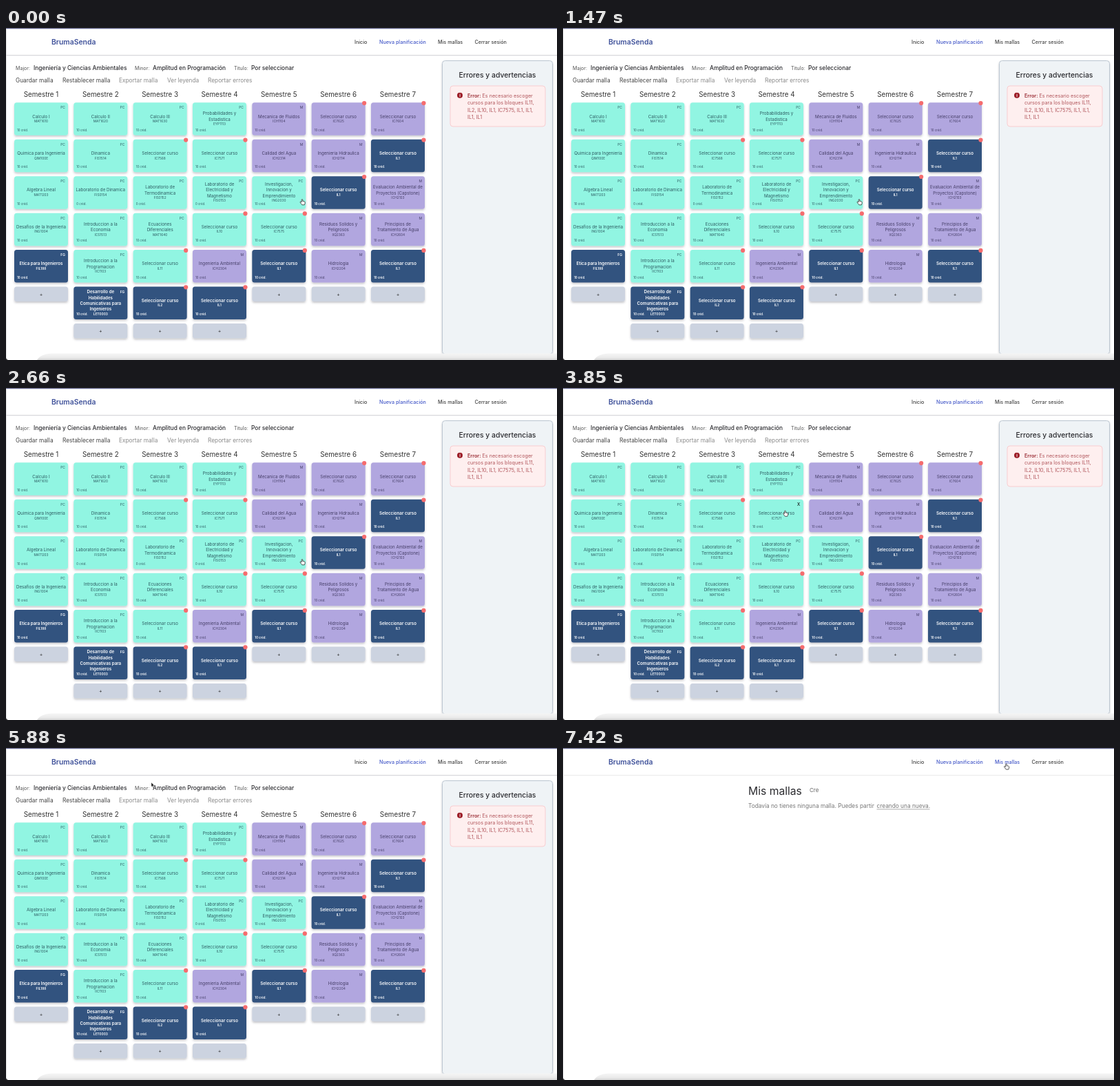
An HTML page that plays this animation: 800x482 px, repeating every 8000 ms.

```html
<!DOCTYPE html>
<html lang="es">
<head>
<meta charset="utf-8">
<title>BrumaSenda</title>
<style>
html, body { margin: 0; width: 100%; height: 100%; overflow: hidden; background: #fff; }
svg { display: block; width: 100%; height: 100%; }
text { font-family: Inter, sans-serif; white-space: pre; }
</style>
</head>
<body>
<svg id="stage" viewBox="0 0 800 482">
  <defs>
    <filter id="shadow" x="-10%" y="-10%" width="120%" height="125%">
      <feDropShadow dx="0" dy="2" stdDeviation="1.8" flood-color="#445" flood-opacity=".3"/>
    </filter>
    <linearGradient id="dock" x1="0" y1="0" x2="0" y2="1">
      <stop offset="0" stop-color="#f5f5f5"/><stop offset=".6" stop-color="#ebebeb"/><stop offset="1" stop-color="#d6d6d6"/>
    </linearGradient>
  </defs>
  <g id="planner"></g>
  <g id="list"></g>
  <g id="frame"></g>
  <circle id="ring" cx="643" cy="22" fill="#6d8cf5" fill-opacity=".12" stroke="#7c99ef" stroke-width="1.4"/>
  <g id="cursor">
    <path id="hand" fill="#fff" stroke="#222" stroke-width=".75" stroke-linejoin="round"
      d="M-1 7.2L-2.9 4.6Q-3.2 3.3-1.6 3.8L-.8 4.5V.6Q0-.4.8.6V3Q3.6 3 4.2 4.2Q4.4 6.4 3.3 8.3H-.2Z"/>
    <path id="arrow" fill="#111" stroke="#fff" stroke-width=".4" d="M0 0V6.4L1.4 5.1L2.4 7.4L3.4 7L2.4 4.8H4.4Z"/>
  </g>
</svg>
<script>
const LOOP = 8000, PAGE_AT = 7415;
const $ = id => document.getElementById(id);

// y is the vertical middle of the capitals
const text = (x, y, size, str, fill = '#333', weight = 400, extra = '') =>
  `<text x="${x}" y="${y + size * .36}" font-size="${size}" fill="${fill}" font-weight="${weight}" ${extra}>${str}</text>`;
const mid = (x, y, size, str, fill, weight) => text(x, y, size, str, fill, weight, 'text-anchor="middle"');
const rect = (x, y, w, h, r, fill, extra = '') =>
  `<rect x="${x}" y="${y}" width="${w}" height="${h}" rx="${r}" fill="${fill}" ${extra}/>`;

// title ; code ; tag ; kind: t teal, p purple, n navy ; credits
const pick = 'Seleccionar curso';
const plan = [
  ['Calculo I;MAT1610;PC;t', 'Quimica para Ingenieria;QIM100E;PC;t', 'Algebra Lineal;MAT1203;PC;t',
   'Desafios de la Ingenieria;ING1004;PC;t', 'Etica para Ingenieros;FIL188;FG;n'],
  ['Calculo II;MAT1620;PC;t', 'Dinamica;FIS1514;PC;t', 'Laboratorio de Dinamica;FIS0154;PC;t;0',
   'Introduccion a la|Economia;ICS1513;PC;t', 'Introduccion a la|Programacion;IIC1103;PC;t',
   'Desarrollo de|Habilidades|Comunicativas para|Ingenieros;LET0003;FG;n'],
  ['Calculo III;MAT1630;PC;t', pick + ';IC7568;;t', 'Laboratorio de|Termodinamica;FIS0152;PC;t;0',
   'Ecuaciones|Diferenciales;MAT1640;PC;t', pick + ';IL11;;t', pick + ';IL2;;n'],
  ['Probabilidades y|Estadistica;EYP1113;PC;t', pick + ';IC7571;;t',
   'Laboratorio de|Electricidad y|Magnetismo;FIS0153;PC;t;0', pick + ';IL10;;t',
   'Ingenieria Ambiental;ICH2304;M;p', pick + ';IL1;;n'],
  ['Mecanica de Fluidos;ICH1104;M;p', 'Calidad del Agua;ICH2314;M;p',
   'Investigacion,|Innovacion y|Emprendimiento;ING2030;PC;t', pick + ';IC7575;;t', pick + ';IL1;;n'],
  [pick + ';IC7625;;p', 'Ingenieria Hidraulica;ICH2114;M;p', pick + ';IL1;;n',
   'Residuos Solidos y|Peligrosos;IIQ2363;M;p', 'Hidrologia;ICH2204;M;p'],
  [pick + ';IC7604;;p', pick + ';IL1;;n', 'Evaluacion Ambiental de|Proyectos (Capstone);ICH2103;M;p',
   'Principios de|Tratamiento de Agua;ICH2604;M;p', pick + ';IL1;;n']
];
const fills = { t: '#91f5e2', p: '#b1a6df', n: '#32527f' };
const inks = { t: '#2c5a60', p: '#443d66', n: '#fff' };
const W = 78, H = 47.5;
const colX = c => 12 + c * 86.33, rowY = r => 108.3 + r * 53.45;
const cards = [];

function card(spec, c, r) {
  const [title, code, tag, kind, credits = 10] = spec.split(';');
  const x = colX(c), y = rowY(r), ink = inks[kind], weight = kind === 'n' ? 600 : 400;
  const lines = title.split('|'), top = y + 20 - (lines.length - 1) * 4.2;
  const open = title === pick, id = `mark${c}${r}`;
  cards.push({ x, y, id: open && id });
  return lines.map((s, i) => mid(x + W / 2, top + i * 8.4, 6.2, s, ink, weight)).join('') +
    mid(x + W / 2, top + lines.length * 8.4 - 1.3, 4.8, code, ink, weight) +
    text(x + 4, y + 40, 4.3, credits + ' créd.', ink, weight) +
    text(x + W - 4, y + 7.2, 5, tag, ink, weight, 'text-anchor="end"') +
    (open ? `<g id="${id}"><circle cx="${x + W - 1.5}" cy="${y + .8}" r="3.1" fill="#f56c6e"/>` +
      text(x + W - 9, y + 7, 6, 'X', '#111', 500) + '</g>' : '');
}

function planner() {
  let boxes = '', labels = '';
  plan.forEach((col, c) => {
    labels += mid(colX(c) + W / 2, 96.8, 9.8, 'Semestre ' + (c + 1), '#333');
    col.forEach((spec, r) => {
      boxes += rect(colX(c), rowY(r), W, H, 3.5, fills[spec.split(';')[3]]);
      labels += card(spec, c, r);
    });
    boxes += rect(colX(c), rowY(col.length), W, 21.5, 3.5, '#ccd3e0');
    labels += mid(colX(c) + W / 2, rowY(col.length) + 10.5, 7, '+', '#333');
  });
  const info = [[14, 'Major:', 40, 'Ingeniería y Ciencias Ambientales'],
    [187, 'Minor:', 213, 'Amplitud en Programación'], [331, 'Título:', 356, 'Por seleccionar']];
  const tools = [[14, 'Guardar malla'], [82, 'Restablecer malla'], [164, 'Exportar malla'],
    [234, 'Ver leyenda'], [293, 'Reportar errores']];
  const red = '#b0545a';
  return info.map(([x, k, vx, v]) => text(x, 58, 7.1, k, '#555') + text(vx, 57.6, 8.4, v, '#2b2b2f', 500)).join('') +
    tools.map(([x, s], i) => text(x, 76.5, 8.3, s, i < 2 ? '#444' : '#8a8a8a')).join('') +
    `<g filter="url(#shadow)">${boxes}</g>` + labels +
    rect(633.5, 47.5, 160, 426, 4, '#eff3f6', 'stroke="#bcc6d1" filter="url(#shadow)"') +
    mid(713.5, 68.3, 10.4, 'Errores y advertencias', '#2b2b2f', 500) +
    rect(645, 84, 138, 59, 4, '#feefef', 'stroke="#f8cdd0"') +
    '<circle cx="659" cy="97.7" r="4" fill="#9c1c26"/>' + mid(659, 97.7, 6, 'i', '#fff', 700) +
    text(670, 98, 7.2, '<tspan font-weight="600" fill="#9c3038">Error:</tspan> Es necesario escoger', red) +
    ['cursos para los bloques IL11,', 'IL2, IL10, IL1, IC7575, IL1, IL1,', 'IL1, IL1']
      .map((s, i) => text(670, 108.5 + i * 10.5, 7.2, s, red)).join('');
}

const list = () =>
  text(269, 62, 15.7, 'Mis mallas', '#2b2b2f') + text(358, 61.5, 8, 'Cre', '#666') +
  text(269, 84.5, 8.3, 'Todavía no tienes ninguna malla. Puedes partir', '#777') +
  text(455.5, 84.5, 8.3, 'creando una nueva.', '#777') +
  rect(455.5, 88.6, 77, .7, 0, '#888');

const frame = () =>
  rect(0, 0, 800, 1.2, 0, '#62648c') + rect(0, 1, .8, 481, 0, '#dededf') +
  '<rect id="rule" y="39" width="800" height="1.2"/>' +
  text(66, 20.3, 10.4, 'BrumaSenda', '#41539b', 600) +
  text(506, 20.5, 7.2, 'Inicio', '#444', 500) +
  text(542, 20.5, 7.2, 'Nueva planificación', '#4458c8', 500) +
  text(627, 20.5, 7.2, 'Mis mallas', '#444', 500, 'id="mine"') +
  text(680.5, 20.5, 7.2, 'Cerrar sesión', '#444', 500) +
  '<path d="M45 482Q50 473 66 472.5H800V482Z" fill="url(#dock)"/><path d="M0 479Q.5 481.5 3 482H0Z" fill="#222"/>';

$('planner').innerHTML = planner();
$('list').innerHTML = list();
$('frame').innerHTML = frame();

// pointer stops: time, x, y
const stops = [[0, 430, 248.5], [3150, 430, 248.5], [3800, 322.5, 178], [4400, 322.5, 178],
  [5350, 211, 50], [5950, 211, 50], [6800, 643.5, 22.8], [LOOP, 643.5, 22.8]];

function pointer(t) {
  const i = stops.findIndex(s => s[0] > t), a = stops[i - 1], b = stops[i];
  const u = (t - a[0]) / (b[0] - a[0]), k = u * u * (3 - 2 * u);
  return [a[1] + (b[1] - a[1]) * k, a[2] + (b[2] - a[2]) * k];
}

const show = (el, on) => el.style.display = on ? '' : 'none';

function draw(now) {
  const t = now % LOOP, [x, y] = pointer(t), listed = t >= PAGE_AT;
  const over = (bx, by, w, h) => x >= bx && x <= bx + w && y >= by && y <= by + h;
  const onMine = over(625, 14, 41, 13);
  let hit = onMine;
  for (const c of cards) {
    const on = over(c.x, c.y, W, H);
    hit = hit || on;
    if (!c.id) continue;
    const [dot, cross] = $(c.id).children;
    show(dot, !on);
    show(cross, on);
  }
  show($('planner'), !listed);
  show($('list'), listed);
  $('rule').setAttribute('fill', listed ? '#ececec' : '#d7d7da');
  $('mine').setAttribute('fill', onMine ? '#4458c8' : '#444');
  show($('hand'), hit);
  show($('arrow'), !hit);
  $('cursor').setAttribute('transform', `translate(${x} ${y})`);
  show($('ring'), t >= 6930 && t < 7340);
  $('ring').setAttribute('r', Math.max(8, Math.min(13.7, 8 + (t - 6930) / 18)));
}

const start = performance.now();
function tick() {
  draw(performance.now() - start);
  requestAnimationFrame(tick);
}
tick();
</script>
</body>
</html>
```
